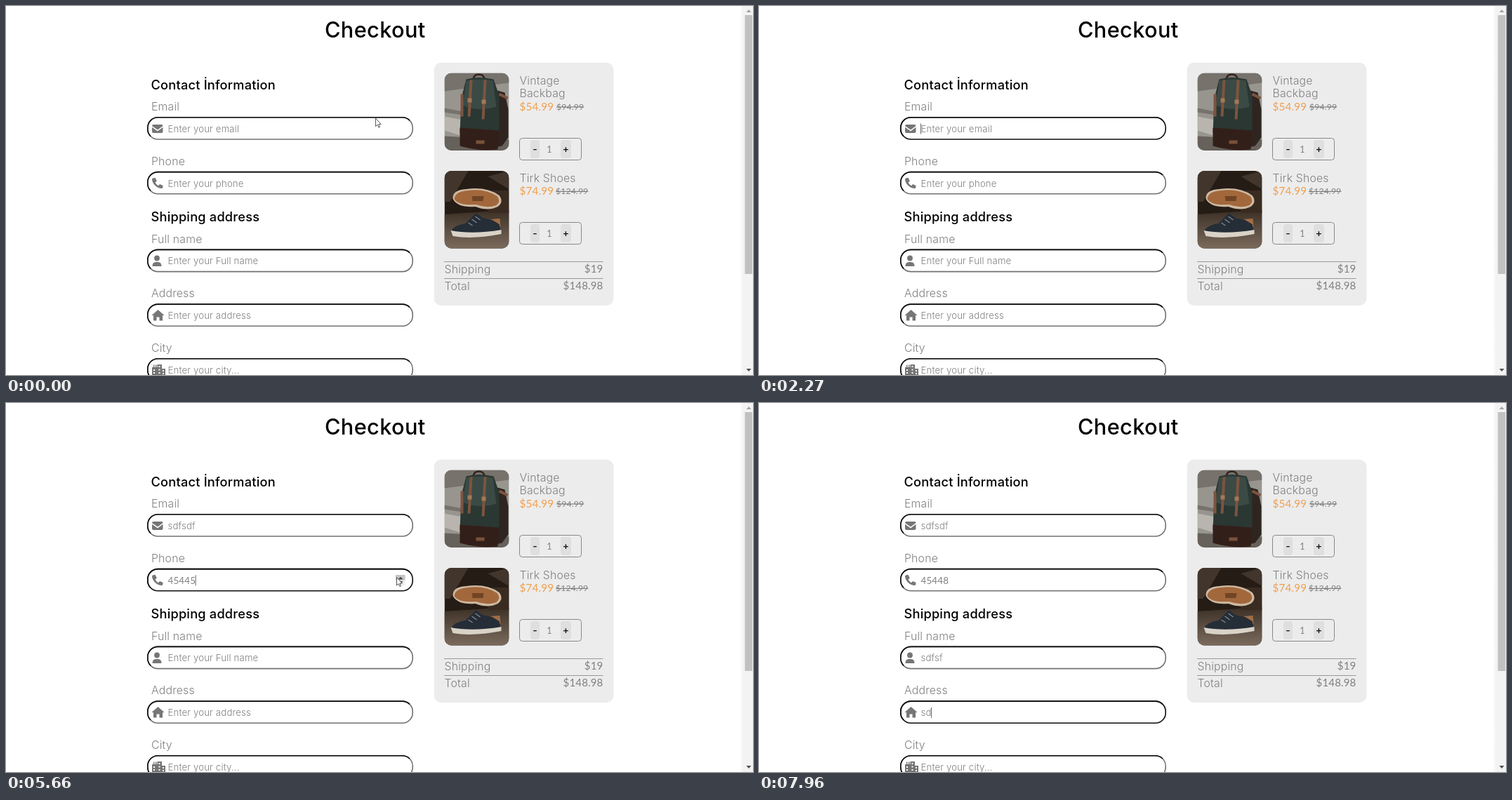
An HTML page that plays this animation: 1064 px wide and 526 px high, repeating every 8 s.

```html
<!DOCTYPE html>
<html lang="en">
<head>
<meta charset="utf-8">
<title>Checkout</title>
<style>
  html, body { margin: 0; width: 100%; height: 100%; overflow: hidden; background: #fff; }
  svg { display: block; }
  text { font: 350 15.8px Inter, sans-serif; letter-spacing: .012em; fill: #808080; white-space: pre; }
  .title { font-size: 30.7px; font-weight: 500; fill: #000; }
  .heading { font-size: 18.2px; font-weight: 500; fill: #000; }
  .price, .old, .number, .digits { font-family: Lato, sans-serif; font-weight: 400; }
  .price { font-size: 15.2px; fill: #f0a050; }
  .old { font-size: 12.2px; text-decoration: line-through; }
  .number { font-size: 15px; }
  .quantity { font-size: 12.5px; }
  .sign { font-size: 14px; font-weight: 500; fill: #111; }
  .end { text-anchor: end; }
  .mid { text-anchor: middle; }
  .value { font-size: 13.2px; }
  .value.digits { font-size: 13.4px; }
  .border { fill: none; stroke: #717171; stroke-width: 1.6; }
  .border.dark { stroke: #0c0c0c; }
</style>
</head>
<body>
<svg id="stage" width="1064" height="526">
  <defs>
    <clipPath id="photo"><rect width="92" height="110.500" rx="10"/></clipPath>
    <linearGradient id="ground" x2="0" y2="1">
      <stop stop-color="#3c3026"/><stop offset="1" stop-color="#7b6b5d"/>
    </linearGradient>
    <linearGradient id="edge">
      <stop stop-color="#fff"/><stop offset="1" stop-color="#f1f1f1"/>
    </linearGradient>
  </defs>

  <rect x="609.700" y="80.800" width="255.700" height="346.200" rx="10" fill="#ececec"/>

  <g transform="translate(624.500 95.500)" clip-path="url(#photo)">
    <path fill="#98958f" d="M0 0H92V111H0Z"/>
    <path fill="#77726c" d="M0 0H92V14L0 26ZM0 50 26 55V60L0 56Z"/>
    <path fill="#b9b5ae" d="M0 62 26 67V90L0 82Z"/>
    <path fill="#67615b" d="M0 90 92 95V111H0Z"/>
    <path fill="none" stroke="#34231c" stroke-width="2.500" d="M41 9Q42 2 49 2T57 9"/>
    <path fill="#2f2520" d="M72 24 86 28 91 52V92L82 104 72 106Z"/>
    <path fill="#2a3733" d="M31 9Q48 4 70 9L78 32V86H22L24 36Z"/>
    <path fill="#3b4a45" d="M31 11Q49 7 69 11L74 48Q50 56 26 46Z"/>
    <path fill="#331f19" d="M22 78 78 82 76 109Q48 112 22 104Z"/>
    <path fill="none" stroke="#7d543f" stroke-width="4" d="M38 10 35 62M58 10 55 66M25 30V62M78 30 90 36"/>
    <path fill="#a57855" d="M33 36H39V42H33ZM53 38H59V44H53Z"/>
    <path fill="#77513a" d="M45 96H57V101H45Z"/>
  </g>

  <g transform="translate(624.500 235)" clip-path="url(#photo)">
    <path fill="#261c16" d="M0 0H92V111H0Z"/>
    <path fill="#42362c" d="M0 0H34L8 44H0ZM62 8 92 0V26Z"/>
    <path fill="url(#ground)" d="M0 62 92 56V111H0Z"/>
    <path fill="#3a2b21" d="M58 28H92V60H62Z"/>
    <path fill="#cdb9a2" d="M12 40Q11 27 31 26 60 22 78 35 85 44 76 51 62 58 44 51 19 53 12 40Z"/>
    <path fill="#a2683c" d="M14 40Q15 29 34 28 58 25 75 36 81 43 74 49 61 54 45 48 20 50 14 40Z"/>
    <path fill="#704526" d="M39 36 56 36 55 43 40 43Z"/>
    <path fill="#a06e45" d="M66 69 79 68 80 80H68Z"/>
    <path fill="#252d37" d="M10 86Q12 78 30 75L45 60 54 67 68 70 78 76 81 88 12 92Z"/>
    <path fill="#d9d2c7" d="M9 85Q40 91 81 84L81 90Q40 98 12 93Z"/>
    <path stroke="#858b93" stroke-width="1.200" d="M34 74 40 78M39 69 46 74M44 65 51 70"/>
  </g>

  <path stroke="#999" d="M624 364.500H850.500M624 388.500H850.500"/>

  <rect x="1045" width="6" height="526" fill="url(#edge)"/>
  <rect x="1051" width="13" height="526" fill="#f3f3f3"/>
  <rect x="1052.500" y="13" width="10.500" height="369" fill="#c1c1c1"/>
  <path fill="#a3a3a3" d="M1054.500 9H1061.500L1058 5Z"/>
  <path fill="#505050" d="M1054.500 517H1061.500L1058 521Z"/>

  <g fill="#767676">
    <path d="M210 169H221.500Q223.500 169 223.500 171L216 176.500 208 171Q208 169 210 169ZM208 172.700 216 178.500 223.500 172.700V179Q223.500 181 221.500 181H210Q208 181 208 179Z"/>
    <path d="M209 245.500 212.500 244.700 214.800 249.500 212.500 251.500Q214 254.500 217 256.200L219 254 223.700 256 222.700 260Q217 260.300 212.500 256T208 246.500Z"/>
    <circle cx="215" cy="359.500" r="3.900"/>
    <path d="M208.500 371Q208.500 365 213.500 365H216.500Q221.500 365 221.500 371Z"/>
    <path d="M216.500 433 225.500 441H223V448.500H218.500V443.500H214.500V448.500H210V441H207.500Z"/>
    <path fill-rule="evenodd" d="M208 515H210V511.500H211.500V515H213V511.500H214.500V515H215.500V511H222V517H227V526H208ZM210 518V520H212V518ZM210 522V524H212V522ZM217.500 513V515H219.500V513ZM217.500 517.500V519.500H219.500V517.500ZM217.500 522V524H219.500V522ZM223 519V521H225V519ZM223 523V525H225V523Z"/>
  </g>
</svg>

<script>
const LOOP = 8000;
const stage = document.getElementById('stage');

function add(parent, tag, attrs, content = '') {
  const node = document.createElementNS('http://www.w3.org/2000/svg', tag);
  for (const name in attrs) node.setAttribute(name, attrs[name]);
  node.textContent = content;
  return parent.appendChild(node);
}

// y is the middle of the capital letters
const label = (x, y, content, style = '', parent = stage) =>
  add(parent, 'text', { x, y, dy: '.364em', class: style }, content);

const show = (node, visible) => { node.style.display = visible ? '' : 'none'; };

label(454, 33.5, 'Checkout', 'title');
label(206.5, 112, 'Contact İnformation', 'heading');
label(206.5, 300.5, 'Shipping address', 'heading');
label(731.5, 106, 'Vintage');
label(731.5, 124, 'Backbag');
label(731.5, 143, '$54.99', 'price');
label(784, 143.5, '$94.99', 'old');
label(731.5, 245.5, 'Tirk Shoes');
label(731.5, 263, '$74.99', 'price');
label(783, 264, '$124.99', 'old');
label(624.5, 375, 'Shipping');
label(850.5, 375, '$19', 'number end');
label(624.5, 399, 'Total');
label(850.5, 399, '$148.98', 'number end');

for (const y of [189, 309]) {
  add(stage, 'rect', { x: 731.5, y: y - .5, width: 88, height: 31, rx: 4, fill: 'none', stroke: '#888' });
  for (const [x, width, sign] of [[747, 13, '-'], [790, 15, '+']]) {
    add(stage, 'rect', { x, y: y + 2, width, height: 26, rx: 4, fill: '#dfdfdf' });
    label(x + width / 2, y + 15, sign, 'sign mid');
  }
  label(774, y + 15, '1', 'number quantity mid');
}

// inset border: grey all round, dark on the top and left
const fields = [
  ['Email', 158, 'email'], ['Phone', 235.8, 'phone'], ['Full name', 346.6, 'Full name'],
  ['Address', 424.3, 'address'], ['City', 501.9, 'city...'],
].map(([name, top, hint]) => {
  label(207, top - 14.8, name);
  const group = add(stage, 'g', { transform: `translate(201 ${top})` });
  const border = add(group, 'rect', { x: .8, y: .8, width: 377.4, height: 31.2, rx: 14.6, class: 'border' });
  add(group, 'path', {
    d: 'M5.08 27.72A14.6 14.6 0 0 1 .8 17.4V15.4A14.6 14.6 0 0 1 15.4 .8H363.6A14.6 14.6 0 0 1 373.92 5.08',
    class: 'border dark',
  });
  const text = label(29.5, 16.9, '', 'value', group);
  const caret = add(group, 'rect', { y: 9.5, width: 1, height: 15, fill: '#666' });
  return { border, text, caret, hint: 'Enter your ' + hint };
});

const spinner = add(stage, 'g', {});
add(spinner, 'rect', { x: 555, y: 245, width: 13.5, height: 15, fill: '#efefef' });
const upButton = add(spinner, 'rect', { x: 555, y: 245, width: 13.5, height: 7.5, fill: '#c4c4c4' });
add(spinner, 'path', { d: 'M558.500 251.500H565.500L562 247.800ZM558.500 254H565.500L562 257.700Z', fill: '#444' });

const cursor = add(stage, 'path', {
  d: 'M0 0V11.500L2.600 9.200 4.400 13.200 6 12.500 4.300 8.600H7.800Z',
  fill: '#fff', stroke: '#333', 'stroke-width': .8,
});

// start, end, steps, first x and y, last x and y; without a position the pointer is hidden
const moves = [
  [0, 0, 1, 526.5, 160, 526.5, 160],
  [100, 170, 2, 480, 99, 434, 38],
  [340, 490, 3, 431, 26, 424.5, -5.5],
  [1230, 1640, 6, 412, 8, 303, 154],
  [1710],
  [3810, 3810, 1, 300, 205, 300, 205],
  [3880],
  [5660, 5660, 1, 556.5, 248.5, 556.5, 248.5],
  [6150, 6440, 5, 537, 271, 443, 334],
  [6530, 6530, 1, 440, 342, 440, 342],
  [6600],
];

function placeCursor(t) {
  const [start, end, steps, x0, y0, x1, y1] = moves.findLast(move => move[0] <= t);
  show(cursor, steps);
  if (!steps) return;
  const last = Math.max(1, steps - 1);
  const p = end > start ? Math.min(last, Math.floor((t - start) / (end - start) * last)) / last : 0;
  cursor.setAttribute('transform', `translate(${x0 + (x1 - x0) * p} ${y0 + (y1 - y0) * p})`);
}

const count = (t, times) => times.filter(time => time <= t).length;
const within = (t, from, to) => t >= from && t < to;

function draw(t) {
  const clicks = count(t, [5800, 5930, 6060]);
  const values = [
    'sdfsdf'.slice(0, count(t, [3250, 3340, 3490, 3560, 3640, 3720])),
    String(45445 + clicks).slice(0, count(t, [4930, 5000, 5100, 5270, 5340])),
    'sdfsf'.slice(0, count(t, [7190, 7340, 7410, 7500, 7580])),
    t >= 7960 ? 'sd' : '',
    '',
  ];
  const focus = count(t, [2270, 4110, 6770, 7730]) - 1;
  const caretOff = within(t, 2770, 3250) || within(t, 4690, 4930) || within(t, 6530, 6770);

  fields.forEach(({ border, text, caret, hint }, i) => {
    const value = values[i];
    text.textContent = value || hint;
    text.classList.toggle('digits', i === 1 && value !== '');
    border.classList.toggle('dark', i === focus);
    show(caret, i === focus && !caretOff);
    caret.setAttribute('x', 29 + (value ? text.getComputedTextLength() : 0));
  });

  show(spinner, within(t, 3880, 6770));
  show(upButton, within(t, 5660, 6150));
  placeCursor(t);
}

function tick() {
  draw(performance.now() % LOOP);
  requestAnimationFrame(tick);
}
tick();
</script>
</body>
</html>
```
